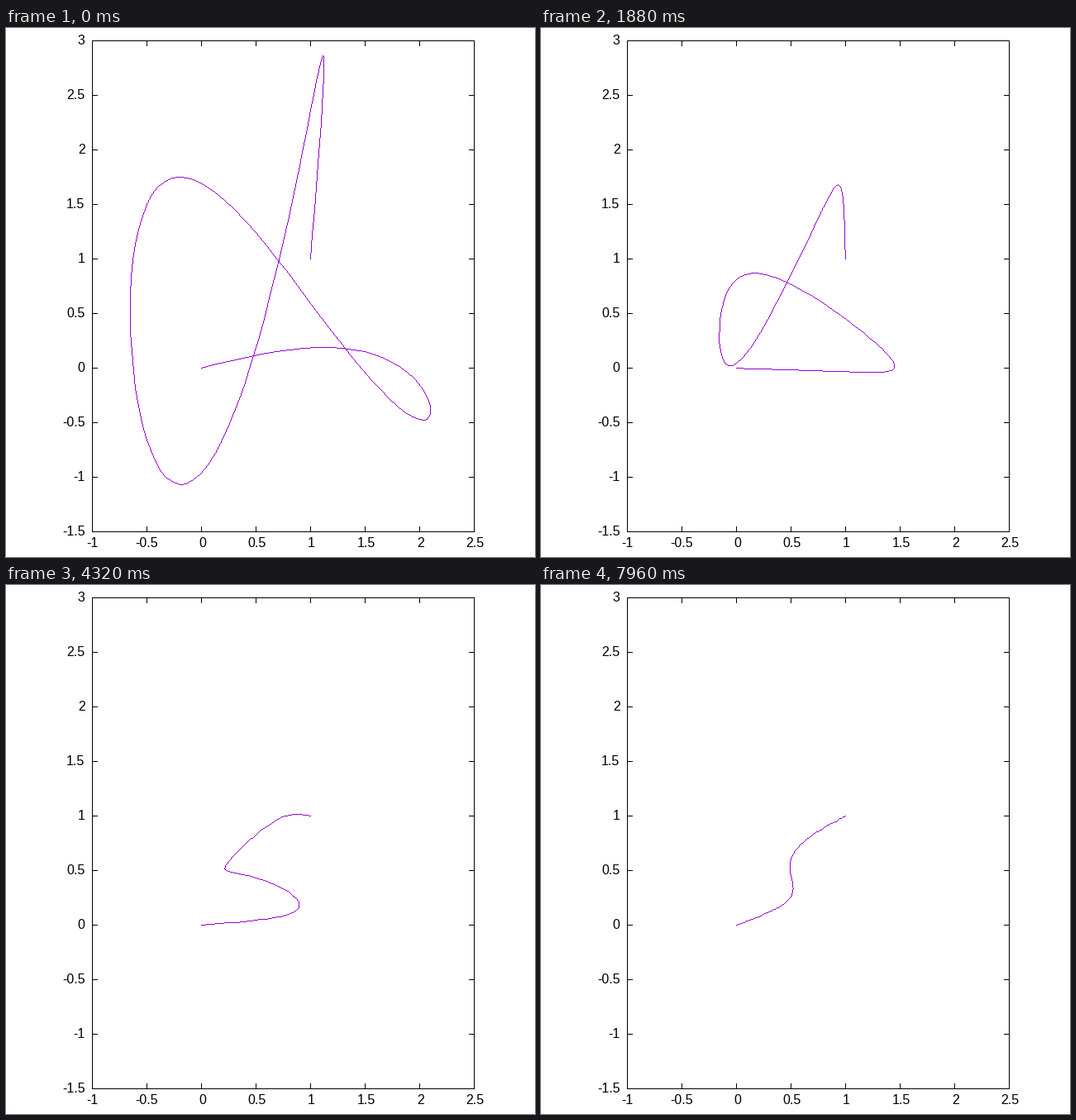
Recreate the animation shown at these times as a matplotlib script. Size 640 by 640 pixels, loop 8 s.

```python
import numpy as np
import matplotlib.pyplot as plt
from matplotlib.animation import FuncAnimation

SIZE, DPI = 640, 100
FRAMES, INTERVAL = 200, 40
LEFT, RIGHT, TOP, BOTTOM = 104, 566, 15, 609
UNIT, TICK = 132, 6                 # pixels per axis unit, tick length
PURPLE = (148, 0, 211)
SEGMENTS = 120

# time in ms: rightmost x, leftmost x and topmost y of the curve's bends
BENDS = {680: (1.788, -0.470, 2.270), 2520: (1.280, -0.034, 1.445),
         4320: (0.880, 0.210, 1.015), 6360: (0.625, 0.395, 1.000)}


def to_px(x, y):
    return LEFT + UNIT * (x + 1), TOP + UNIT * (3 - y)


def relax(p, rate, power, lift):
    """One implicit step of p_t = (p_s / (lift^2 + |p_s|^2)^(power/2))_s."""
    speed2 = np.sum((np.diff(p, axis=0) * SEGMENTS) ** 2, axis=1)
    w = rate * SEGMENTS ** 2 * (lift ** 2 + speed2) ** (-power / 2)
    a = np.diag(1 + w[:-1] + w[1:]) - np.diag(w[1:-1], 1) - np.diag(w[1:-1], -1)
    rhs = p[1:-1].copy()
    rhs[0] += w[0] * p[0]
    rhs[-1] += w[-1] * p[-1]
    return np.vstack([p[:1], np.linalg.solve(a, rhs), p[-1:]])


def flow(params, count):
    rate, power, lift = np.exp(params)
    s = np.linspace(0, 1, SEGMENTS + 1)
    wave = lambda k: np.sin(k * np.pi * s)
    paths = [np.column_stack([s + wave(2) + wave(3), s - wave(4) + wave(5)])]
    while len(paths) < count:
        paths.append(relax(paths[-1], rate, power, lift))
    return paths


def misfit(params):
    paths = flow(params, max(BENDS) // INTERVAL + 1)
    half = SEGMENTS // 2
    out = []
    for t, bend in BENDS.items():
        x, y = paths[t // INTERVAL].T
        out += [x[:half].max() - bend[0], x[half:].min() - bend[1],
                y.max() - bend[2]]
    return np.array(out)


def tune(params, rounds=9, nudge=1e-3):
    """Levenberg-Marquardt on the logarithms of rate, power and lift."""
    err, damp = misfit(params), 0.01
    for _ in range(rounds):
        jac = np.column_stack([(misfit(params + d) - err) / nudge
                               for d in nudge * np.eye(3)])
        hess = jac.T @ jac
        hess += damp * np.diag(np.diag(hess)) + 1e-6 * np.eye(3)
        move = np.clip(np.linalg.solve(hess, -jac.T @ err), -0.7, 0.7)
        trial = misfit(params + move)
        if trial @ trial < err @ err:
            params, err, damp = params + move, trial, damp / 4
        else:
            damp *= 8
    return params


def stroke(canvas, xs, ys, color):
    """One-pixel polyline without smoothing."""
    xs, ys = np.rint(xs).astype(int), np.rint(ys).astype(int)
    for x0, y0, x1, y1 in zip(xs, ys, xs[1:], ys[1:]):
        n = max(abs(x1 - x0), abs(y1 - y0)) + 1
        cols = np.rint(np.linspace(x0, x1, n)).astype(int)
        rows = np.rint(np.linspace(y0, y1, n)).astype(int)
        canvas[rows, cols] = color


plt.rcParams["font.family"] = "Liberation Sans"
fig = plt.figure(figsize=(SIZE / DPI, SIZE / DPI), dpi=DPI, facecolor="white")
ax = fig.add_axes([0, 0, 1, 1])
ax.axis("off")


def label(x, y, value, ha):
    ax.text(x, y, f"{value:g}", fontsize=16 * 72 / DPI, ha=ha, va="baseline")


frame = np.full((SIZE, SIZE, 3), 255, np.uint8)
stroke(frame, [LEFT, RIGHT, RIGHT, LEFT, LEFT],
       [TOP, TOP, BOTTOM, BOTTOM, TOP], 0)
for v in np.arange(-1, 2.6, 0.5):
    x, _ = to_px(v, 0)
    stroke(frame, [x, x], [BOTTOM, BOTTOM - TICK], 0)
    stroke(frame, [x, x], [TOP, TOP + TICK], 0)
    label(x + 1.5 if v >= 0 else x + 0.5, 628.5, v, "center")
for v in np.arange(-1.5, 3.1, 0.5):
    _, y = to_px(0, v)
    stroke(frame, [LEFT, LEFT + TICK], [y, y], 0)
    stroke(frame, [RIGHT, RIGHT - TICK], [y, y], 0)
    label(95.5, y + 4.5, v, "right")

paths = flow(tune(np.log([0.0008, 0.8, 3.0])), FRAMES)
picture = ax.imshow(frame, extent=(0, SIZE, SIZE, 0), aspect="auto",
                    interpolation="nearest")


def draw(i):
    canvas = frame.copy()
    stroke(canvas, *to_px(*paths[i].T), PURPLE)
    picture.set_data(canvas)
    return picture,


anim = FuncAnimation(fig, draw, frames=FRAMES, interval=INTERVAL,
                     repeat=True, repeat_delay=0)
plt.show()
```
